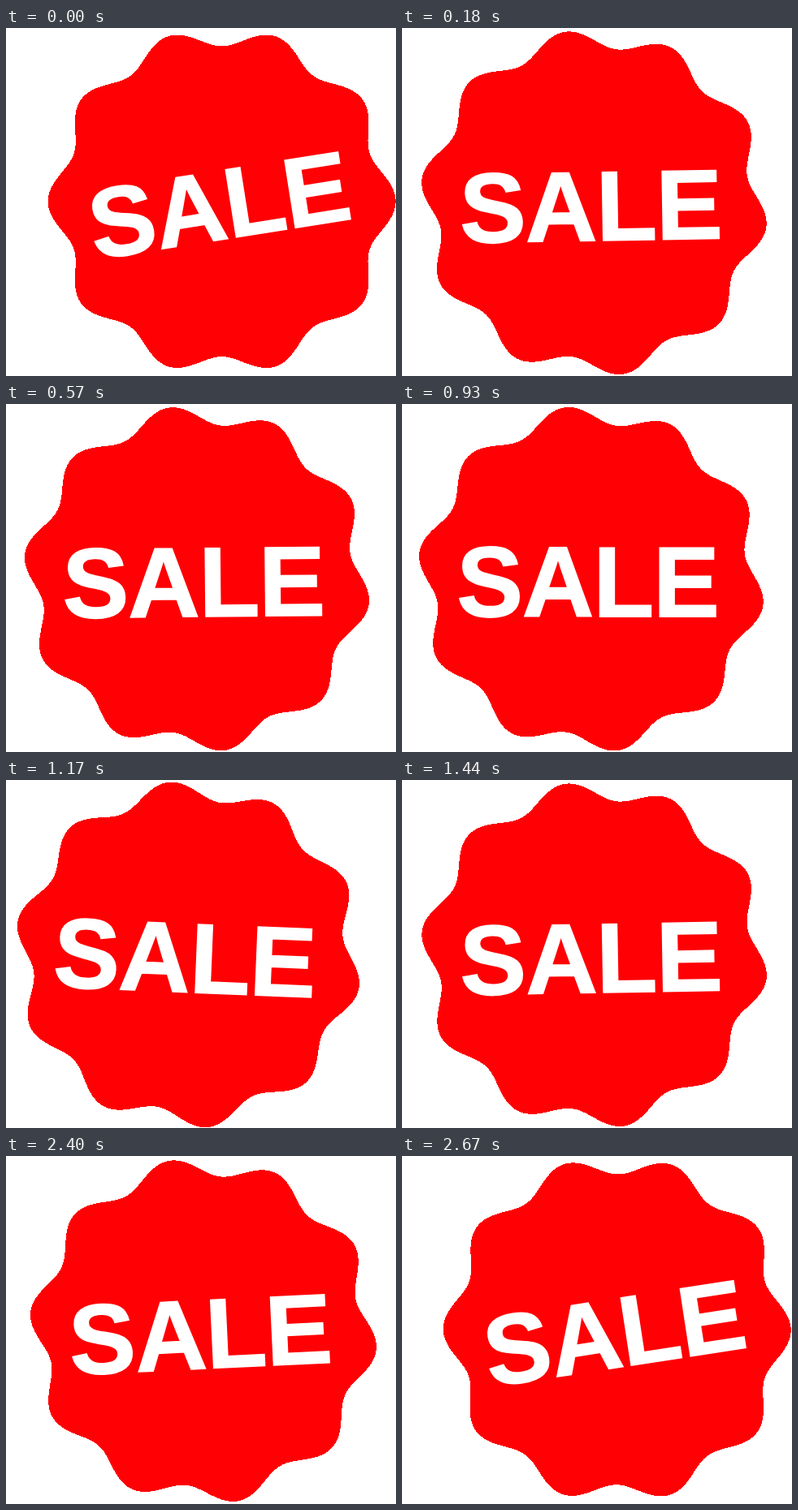
An HTML page that plays this animation: 480x429 px, repeating every 2.7 s.

```html
<!DOCTYPE html>
<html lang="en">
<head>
<meta charset="utf-8">
<title>Sale badge</title>
<style>
  /* A registered angle keeps the badge redrawn crisply at every step */
  @property --tilt { syntax: "<angle>"; inherits: false; initial-value: 0deg; }
  html, body { margin: 0; width: 100%; height: 100%; overflow: hidden; background: #fff; }
  svg { display: block; width: 480px; height: 429px; }
  #tag {
    transform-box: view-box;
    transform-origin: 237px 7.5px;
    transform: rotate(var(--tilt));
    animation: swing 2.7s cubic-bezier(.333, 0, .667, 1) infinite;
  }
  #badge { fill: #ff0004; shape-rendering: crispEdges; }
  text {
    font: bold 122px "Liberation Sans", Arial, Helvetica, sans-serif;
    letter-spacing: -.7px;
    fill: #fff;
    stroke: #fff;
    stroke-width: 1.8px;
  }
  /* Swing loses two degrees each pass, rests, then winds up again */
  @keyframes swing {
    0%       { --tilt: -9deg; }
    13.3333% { --tilt: 7deg; }
    26.6667% { --tilt: -5deg; }
    40%      { --tilt: 3deg; }
    53.3333% { --tilt: -1deg; }
    66.6667% { --tilt: 0deg; }
    83.3333% { --tilt: 0deg; animation-timing-function: cubic-bezier(.167, 0, .833, 1); }
    100%     { --tilt: -9deg; }
  }
</style>
</head>
<body>
<svg viewBox="0 0 480 429">
  <g id="tag">
    <path id="badge"/>
    <text x="67.5" y="262">SALE</text>
  </g>
</svg>
<script>
  // Ten-lobed wavy disc
  const cx = 233, cy = 215.7, lobes = 10, steps = 720;
  const turn = 9 * Math.PI / 180;
  const points = Array.from({ length: steps }, (_, i) => {
    const a = i / steps * 2 * Math.PI;
    const r = 202.7 + 11.3 * Math.cos(lobes * a);
    const x = cx + r * Math.cos(a + turn);
    const y = cy + r * Math.sin(a + turn);
    return x.toFixed(2) + ' ' + y.toFixed(2);
  });
  document.getElementById('badge').setAttribute('d', 'M' + points.join('L') + 'Z');
</script>
</body>
</html>
```
